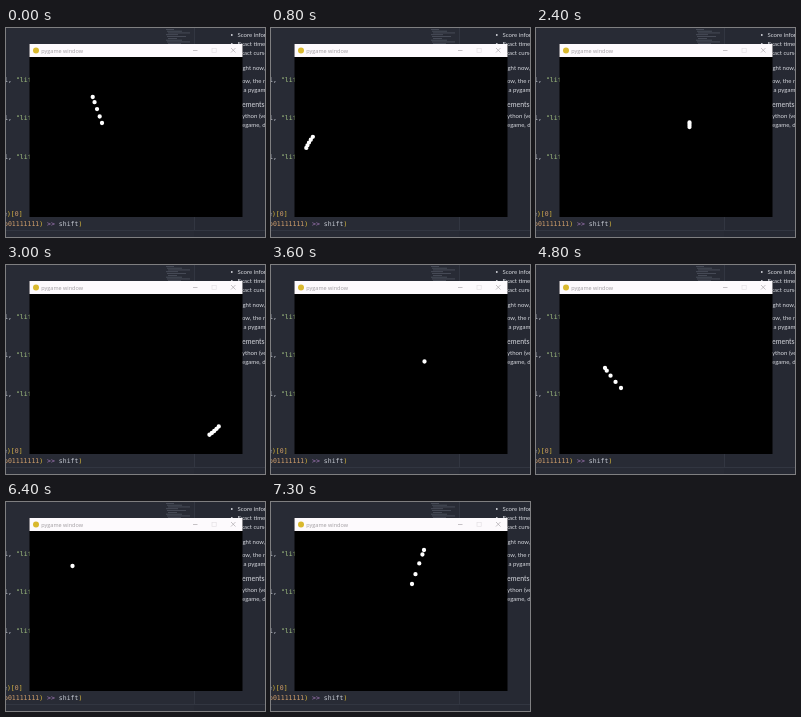
Write an HTML page that moves like this. It is 259x209 px and loops after 7400 ms.

```html
<!DOCTYPE html>
<html lang="en">
<head>
<meta charset="utf-8">
<title>Cursor trail</title>
<style>
  html, body { margin: 0; width: 100%; height: 100%; overflow: hidden; background: #282b35; }
  svg { display: block; width: 259px; height: 209px; }
  text { white-space: pre; }
  .code { font: 6.5px "DejaVu Sans Mono", monospace; fill: #c9cdd6; }
  .str { fill: #a5c584; }
  .num { fill: #d3a06c; }
  .op { fill: #ad7fc4; }
  .paren { fill: #e0bd3c; }
  .doc { font: 6px Lato, sans-serif; fill: #d6d8de; }
  .head { font-size: 7px; }
  .title { font: 5.5px "Open Sans", sans-serif; fill: #a09ca0; }
</style>
</head>
<body>
<svg viewBox="0 0 259 209">
  <rect width="259" height="209" fill="#282b35"/>
  <rect x="188" width="71" height="209" fill="#262933"/>
  <path d="M188.5 0V202M0 202.5H259" stroke="#323641"/>
  <g id="map" fill="#7f8596" opacity=".5"></g>

  <g class="code">
    <g id="calls"></g>
    <text x="-3" y="188">e<tspan class="paren">)[</tspan><tspan class="num">0</tspan><tspan class="paren">]</tspan></text>
    <text x="-2" y="198"><tspan class="num">o01111111</tspan><tspan class="paren">)</tspan> <tspan class="op">&gt;&gt;</tspan> shift<tspan class="paren">)</tspan></text>
  </g>
  <g class="doc">
    <g id="list"></g>
    <text x="236.5" y="41.5">ght now, the</text>
    <text x="236" y="55">ow, the mod</text>
    <text x="237.5" y="64">a pygame</text>
    <text x="236" y="79" class="head">ements</text>
    <text x="236" y="90">ython (version</text>
    <text x="236" y="99">egame, dear</text>
  </g>

  <rect x="23.5" y="16" width="213" height="173" fill="#000"/>
  <rect x="23.5" y="16" width="213" height="13" fill="#fdfafd"/>
  <circle cx="30" cy="22.5" r="3" fill="#d9b92e"/>
  <text class="title" x="35.3" y="24.6">pygame window</text>
  <g fill="none" stroke="#a29da2" stroke-width=".6">
    <path d="M187 22.5h4.5M225 20l4.5 4.5m0-4.5l-4.5 4.5"/>
    <rect x="206" y="20.3" width="4.2" height="4.2" opacity=".3"/>
  </g>
  <path id="trail" stroke="#fff" stroke-width="4.3" stroke-linecap="round"/>
</svg>
<script>
const LOOP = 7400, STEP = 100, GAP = 20, DOTS = 5;
const $ = id => document.getElementById(id);

function add(parent, tag, attrs, text) {
  const el = document.createElementNS("http://www.w3.org/2000/svg", tag);
  for (const k in attrs) el.setAttribute(k, attrs[k]);
  if (text) el.textContent = text;
  return parent.appendChild(el);
}

// Text behind the window
for (let i = 0; i < 3; i++) {
  const line = add($("calls"), "text", { x: -1.8, y: 53.7 + i * 38.5 }, "l, ");
  add(line, "tspan", { class: "str" }, '"lit"');
}
["Score information", "Exact time", "Exact cursor"].forEach((s, i) => {
  add($("list"), "circle", { cx: 225.8, cy: 7 + i * 9, r: 0.9 });
  add($("list"), "text", { x: 231.5, y: 9 + i * 9 }, s);
});
for (let i = 0; i < 9; i++) {
  add($("map"), "rect", { x: 160 + i % 3, y: 1 + i * 1.8, width: 8 + i * 7 % 17, height: 0.7 });
}

// Cursor turning points: time, x, y and optional rest
const path = [
  [-80, 96, 95], [20, 86, 67, 300], [850, 34, 126], [1320, 74, 178], [1400, 86, 175],
  [1900, 146, 142], [2120, 153.5, 94.5, 200], [2400, 153.5, 99], [2800, 190, 175],
  [3150, 222, 140], [3300, 205, 84], [3520, 153.5, 96.5, 180], [4050, 189, 115],
  [4400, 25, 53], [4650, 114, 146], [4720, 85, 123], [4800, 69, 103],
  [4920, 67.5, 99.5, 200], [5400, 102, 112], [5620, 68, 154], [5700, 74.5, 166],
  [5900, 34, 91], [6100, 25, 53], [6320, 66.5, 64, 200], [7100, 154.5, 43.5],
  [7220, 153, 48], [7300, 141, 82]
].flatMap(([t, x, y, rest]) => rest ? [[t, x, y], [t + rest, x, y]] : [[t, x, y]]);

// Monotone cubic, so the curve never passes its turning points
const slope = (i, c) => (path[i + 1][c] - path[i][c]) / (path[i + 1][0] - path[i][0]);
function tangent(i, c) {
  if (i === 0) return slope(0, c);
  if (i === path.length - 1) return slope(i - 1, c);
  const a = slope(i - 1, c), b = slope(i, c);
  return a * b > 0 ? 2 * a * b / (a + b) : 0;
}
function cursor(t) {
  let i = 0;
  while (i < path.length - 2 && path[i + 1][0] < t) i++;
  const [t0] = path[i], h = path[i + 1][0] - t0, u = (t - t0) / h, v = 1 - u;
  return [1, 2].map(c =>
    path[i][c] * (1 + 2 * u) * v * v + path[i + 1][c] * u * u * (3 - 2 * u) +
    h * (tangent(i, c) * u * v * v - tangent(i + 1, c) * u * u * v));
}

function draw(now) {
  const t = Math.floor(now % LOOP / STEP) * STEP;
  const dots = Array.from({ length: DOTS }, (_, i) => cursor(t - i * GAP));
  $("trail").setAttribute("d", dots.map(([x, y]) => `M${x.toFixed(2)} ${y.toFixed(2)}h0`).join(""));
}

const start = performance.now();
function tick() {
  draw(performance.now() - start);
  requestAnimationFrame(tick);
}
tick();
</script>
</body>
</html>
```
